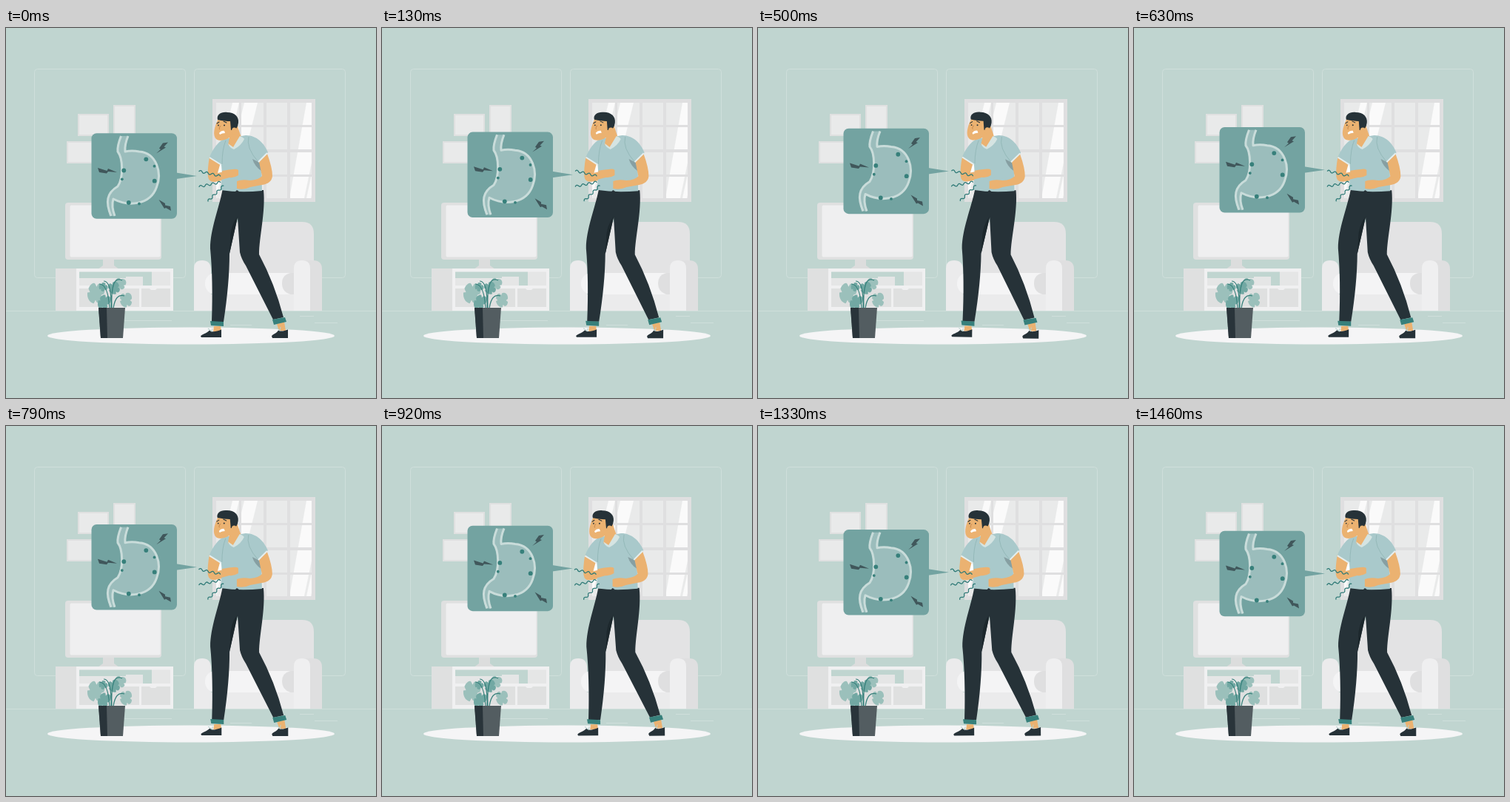
Recreate the animation shown at these times as an HTML page. Size 500 px wide and 500 px high, loop 1500 ms.

```html
<!DOCTYPE html>
<html lang="en">
<head>
<meta charset="utf-8">
<title>Stomach ache</title>
<style>
  html, body { margin: 0; width: 100%; height: 100%; overflow: hidden; background: #c0d5d0; }
  svg { display: block; width: 100%; height: 100%; }
  .line { fill: none; stroke: #cfdfdb; }
  .skin { fill: #ebb271; }
  .dark { fill: #263238; }
  .teal { fill: #37807b; }
  .wave { fill: none; stroke: #2f7a77; stroke-width: 1.3; stroke-linecap: round; }
</style>
</head>
<body>
<svg viewBox="0 0 500 500">
  <defs>
    <path id="wave" class="wave" d="M0 0q2.100-2.800 4.200 0t4.200 0 4.200 0 4.200 0 4.200 0 4.200 0 4.200 0"/>
    <path id="leaf" d="M0-10C6-13 11-8 10-2L7 0 10 2C10 7 6 9 4 8L2 6 1 10C-5 10-9 6-10 1L-7 0-10-3C-9-9-5-11-3-9L-1-7Z"/>
    <clipPath id="panes"><path d="M284 101h31v30h-31zM318 101h30v30h-30zM352 101h28v30h-28zM384 101h29v30h-29zM284 134h31v30h-31zM318 134h30v30h-30zM352 134h28v30h-28zM384 134h29v30h-29zM284 168h31v30h-31zM318 168h30v30h-30zM352 168h28v30h-28zM384 168h29v30h-29zM284 201h31v29h-31zM318 201h30v29h-30zM352 201h28v29h-28zM384 201h29v29h-29z"/></clipPath>
  </defs>

  <!-- room -->
  <g class="line">
    <rect x="38.500" y="55.500" width="204" height="282" rx="4"/>
    <rect x="254.500" y="55.500" width="204" height="282" rx="4"/>
    <path d="M0 382.500H500M397 389.500h19M417 398.500h31M160 395.500h64M303 401.500h29"/>
  </g>
  <ellipse cx="250" cy="416" rx="194" ry="11.500" fill="#f5f5f6"/>
  <g fill="#e9eaea" stroke="#dfe0e0" stroke-width="2">
    <path d="M98 117h40v28H98zM146 105h28v42h-28zM83 154h40v28H83z"/>
  </g>

  <!-- window -->
  <path fill="#dfdfe0" d="M279 96h139v139H279z"/>
  <g clip-path="url(#panes)">
    <path fill="#e9eaea" d="M284 101h129v129H284z"/>
    <path fill="#fafafa" d="M306 101h9l-31 129h-9zM322 101h18l-32 129h-18zM406 101h24l-27 129h-20zM434 101h6l-28 129h-6z"/>
  </g>

  <!-- television and cabinet -->
  <path fill="#dcdddd" d="M131 312h15v9l7 5h-29l7-5z"/>
  <rect x="80" y="236" width="130" height="77" rx="4" fill="#dfe0e0"/>
  <rect x="86.500" y="239.500" width="122" height="70" rx="2" fill="#efeff0"/>
  <path fill="#f0f0f1" d="M67 325h159v57H67z"/>
  <path fill="#dfe0e0" d="M67 325h28v57H67zM183 352h39v25h-39zM99 352h81v25H99z"/>
  <path fill="#c0d5d0" d="M99 329.500h98V348h-12v-10H99z"/>
  <path fill="#e5e6e6" d="M197 329.500h25V348h-25zM99 338h63v10H99zM162 336h23v12h-23z"/>
  <path fill="#f0f0f1" d="M194 352h10l-2 2h-6z"/>

  <!-- sofa -->
  <path fill="#e3e3e4" d="M290 382V262h110q16 0 16 16v104z"/>
  <path fill="#ebebec" d="M254 382v-57q0-11 11-11t12 11v35h113v22z"/>
  <rect x="269" y="331" width="125" height="29" rx="14" fill="#f4f4f5"/>
  <path fill="#dfdfe0" d="M390 331h-5q-12 2-12 14t12 15h5z"/>
  <path fill="#dfdfe0" d="M400 314h15q12 0 12 12v56h-27z"/>
  <path fill="#efeff0" d="M389 382v-57q0-11 11-11t11 11v57z"/>

  <!-- plant -->
  <g fill="#9bc0bb">
    <use href="#leaf" transform="translate(121 359) rotate(15) scale(1.1 1.35)"/>
    <use href="#leaf" transform="translate(162 368) scale(.8 .95)"/>
    <use href="#leaf" transform="translate(154 346) rotate(20) scale(.75)"/>
  </g>
  <g fill="#72a8a3">
    <use href="#leaf" transform="translate(146 352) rotate(-15) scale(.75 .8)"/>
    <use href="#leaf" transform="translate(132 371) rotate(30) scale(.75 1)"/>
    <use href="#leaf" transform="translate(131 350) rotate(60) scale(.55)"/>
  </g>
  <path fill="none" stroke="#37807b" stroke-width="1.200" d="M140 379Q138 346 126 346M142 379Q143 342 132 342M143 379Q141 333 157 341M145 379Q148 358 160 362"/>
  <path fill="#535d61" d="M125 378h36l-3 41h-30z"/>
  <path fill="#29343a" d="M125 378h11l1 41h-9z"/>

  <!-- man -->
  <g id="man">
    <path class="skin" d="M281 403h9l1 7h-11zM366 400l10-3 2 12h-9z"/>
    <path class="dark" d="M263 416.500c2-3 7-3 12-8 3 3 9 2 16-1v10.500h-27zM359 416.500c1-3 6-3 9-8 3 2 8 1 13-1v11.500h-21z"/>
    <path fill="none" stroke="#b9d2cf" d="M273 406l5 4 1-4M366 405l4 4 1-5"/>
    <path class="dark" d="M292.500 219C288 243 276 272 276 298Q280 340 278 397H294Q302 345 302 305L313 256 316 303Q318 312 324 321L361 394 375 391Q363 345 342 306C342 283 351 248 348 219Z"/>
    <path fill="#1c272c" d="M313 255q-10 12-10 32l-1 18z"/>
    <path class="teal" d="M276 396l18 1v6l-17-1zM360 394l17-3 2 6-17 4z"/>

    <path fill="#fff" d="M290 180l4-2-1 18-5 0z"/>
    <path class="skin" d="M275 174q-3 17-2 27 1 7 8 7 11-1 22-6 10 0 11-4v-6q-8-3-15 1l-13 3 5-18z"/>
    <path fill="#a9c9cb" d="M300 149C289 149 279 164 275 175L291 185 292 198 290 219Q316 223 346 220L345 183 354 168C349 156 339 145 324 145Z"/>
    <path class="skin" d="M292 193q11-2 14-2 6-1 8 1v7q-6 4-12 3l-11 3z"/>
    <path fill="#869fa2" d="M333 177q3 10 12 16l-2-11z"/>
    <path class="skin" d="M342 181l11-11q7 19 7 30-1 10-14 12l-16 3q-8 4-18 2v-10q7-3 18-1 12-1 16-6z"/>
    <path fill="none" stroke="#86adac" stroke-width=".600" d="M328 147q-4 15 13 34M297 152q-5 12-5 32"/>
    <path fill="none" stroke="#e5eeee" stroke-width="2" d="M275 175l16 10M341 181l12-12"/>
    <path class="dark" d="M310 221l2-2 3 2z"/>

    <path class="skin" d="M287 122C281 135 279 145 284 150 289 154 297 151 302 148L300 158 307 163 318 148 313 133 304 121Z"/>
    <path fill="#d5e4e2" d="M300 156l7 5 9-15q5 2 6 4-4 9-14 14-6-2-8-8z"/>
    <path class="dark" d="M286 124C284 117 291 113 299 114 309 114 315 120 314 128Q313 136 308 138L304 138 303 126Q296 126 286 124Z"/>
    <ellipse class="skin" cx="308.500" cy="139" rx="3.500" ry="4.500"/>
    <path fill="#fff" d="M288 142q3-4 7-3l1 3q-4 0-7 2z"/>
    <path fill="none" stroke="#c98a50" d="M290 132q-3 4-1 5"/>
    <path fill="none" stroke="#263238" d="M285 129l3-2M294 126l4 2" stroke-linecap="round"/>
    <circle class="dark" cx="287" cy="131.500" r=".900"/><circle class="dark" cx="295" cy="131.500" r="1"/>

    <use href="#wave" transform="translate(261 193.500) rotate(13)"/>
    <use href="#wave" transform="translate(261 214.500) rotate(-12)"/>
    <use href="#wave" transform="translate(273 234) rotate(-45)"/>
  </g>

  <!-- speech bubble -->
  <g id="bubble">
    <path fill="#73a3a1" d="M230 195.500l28 4.500-28 4z"/>
    <rect x="115.500" y="142.300" width="115.500" height="115.400" rx="7" fill="#73a3a1"/>
    <path fill="#9bbdbc" d="M155 146Q150 160 151 168C158 176 158 202 151 214 137 224 135 232 140 254L147 254Q142 242 145 231C163 241 193 241 203 219 211 196 204 167 180 167Q169 165 161 167 160 158 165 146Z"/>
    <path fill="none" stroke="#c9dcda" stroke-width="3" stroke-linejoin="round" d="M155.500 146Q150 160 151 167C158 176 159 202 151 214 136 223 134 235 142 254M165 146Q160 158 161 167 170 165 180 167C204 169 211 196 203.500 215 195 239 166 242 145 231Q142 241 147 254"/>
    <g class="teal">
      <circle cx="159.300" cy="192.500" r="2.900"/><circle cx="156.800" cy="204.300" r="1.900"/>
      <circle cx="189.300" cy="177.300" r="2.900"/><circle cx="200.500" cy="186.700" r="1.900"/>
      <circle cx="200.700" cy="206.700" r="2.900"/><circle cx="165.800" cy="236" r="2.900"/>
      <circle cx="180" cy="237.500" r="1.900"/>
    </g>
    <path fill="#40575b" d="M150 195L138 190 136.500 193 124 189 126 195 136 196.500 138 194ZM203 169.500L209 164 207 162.500 212 155.500 219 154.500 213.500 160.500 216 161.500ZM206.500 232L215 237 215 239.500 222 241 223 247 216 243 214 244Z"/>
  </g>
</svg>
<script>
  const LOOP = 1500;
  const man = document.getElementById('man');
  const bubble = document.getElementById('bubble');

  // Triangle wave: 0 at the start, 1 at half the loop, 0 at its end.
  const triangle = p => 1 - Math.abs(2 * (p - Math.floor(p)) - 1);

  function draw() {
    const p = performance.now() % LOOP / LOOP;
    bubble.setAttribute('transform', `translate(0 ${-9.8 * triangle(p)})`);
    man.setAttribute('transform', `rotate(${2 * triangle(p + .25) - 1} 321 266)`);
    requestAnimationFrame(draw);
  }
  draw();
</script>
</body>
</html>
```
